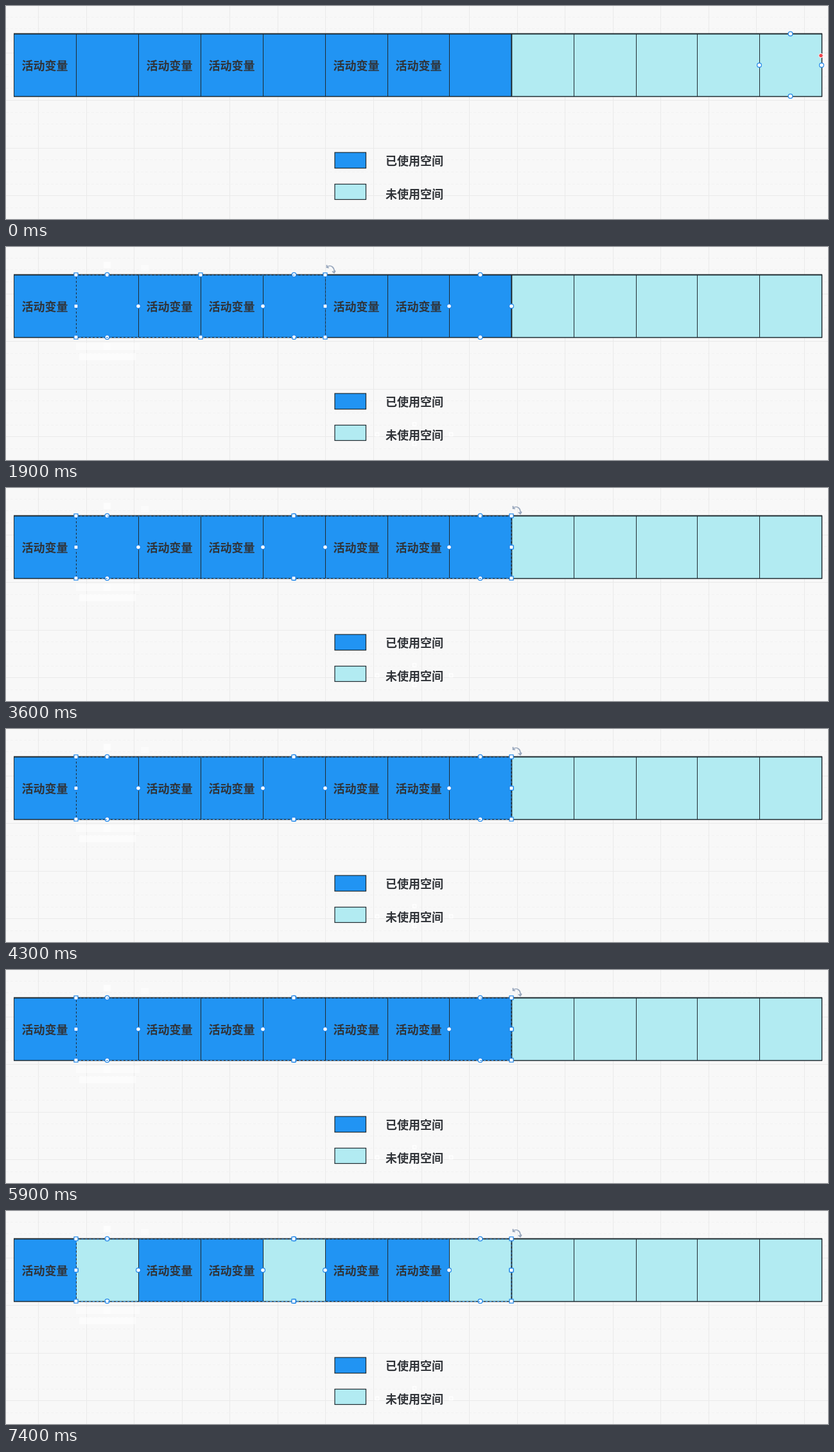
Animation of 1280 by 333 pixels, one loop 7.5 s. Source, as an HTML page:

```html
<!DOCTYPE html>
<html lang="zh">
<head>
<meta charset="utf-8">
<style>
html, body { margin: 0; width: 100%; height: 100%; overflow: hidden; background: #f8f8f8; }
svg { display: block; width: 1280px; height: 333px; }
text { font: bold 18px "Noto Sans CJK SC", "Noto Sans CJK", sans-serif; fill: #303338; }
.edge { stroke: #1f2a30; }
.handle { fill: #fff; stroke: #1f86ea; stroke-width: 1.2; }
.icon { fill: none; stroke: #98a7bd; stroke-width: 1.7; }
.ghost { fill: #fff; }
</style>
</head>
<body>
<svg id="stage" viewBox="0 0 1280 333"></svg>
<script>
const LOOP = 7500, USED = '#2194f3', FREE = '#b2ebf2', TOP = 43.5, BOTTOM = 141.5, MID = 92.5;
const edges = [12.5, 109.5, 206.5, 303.5, 400.5, 497.5, 594.5, 690.5, 787.5, 884.5, 981.5, 1076.5, 1173.5, 1270.5];
const stage = document.getElementById('stage');

function add(parent, tag, attrs, text) {
  const el = document.createElementNS('http://www.w3.org/2000/svg', tag);
  for (const key in attrs) el.setAttribute(key, attrs[key]);
  if (text) el.textContent = text;
  return parent.appendChild(el);
}
const group = () => add(stage, 'g', {});
const rect = (parent, x, y, width, height, attrs) => add(parent, 'rect', { x, y, width, height, ...attrs });
const line = (x1, y1, x2, y2, attrs) => add(stage, 'line', { x1, y1, x2, y2, ...attrs });
const circle = (parent, cx, cy) => add(parent, 'circle', { cx, cy, r: 3.4, class: 'handle' });
const square = (parent, x, y) => rect(parent, x - 3, y - 3, 6, 6, { class: 'handle' });

function drawGrid() {
  const step = 74.55 / 4;
  for (let i = -3; i < 70; i++) {
    const major = i % 4 === 0;
    const style = major ? { stroke: '#eaeaea' } : { stroke: '#f2f2f2', 'stroke-dasharray': '4 3' };
    const x = Math.floor(50.7 + i * step) + 0.5, y = Math.floor(73 + i * step) + 0.5;
    if (major) line(x, 0, x, 333, style);
    if (y < 333) line(0, y, 1280, y, style);
  }
}

// Pale traces left on the board after an earlier selection
function drawTextGhosts() {
  const g = group();
  for (const [x, y] of [[636, 277], [578, 293], [693, 293], [636, 308]])
    rect(g, x - 2.5, y - 2.5, 5, 5, { fill: 'none', stroke: '#fff', 'stroke-width': 1.5 });
  return g;
}
function drawCellGhosts() {
  const g = group();
  rect(g, 152, 23, 11, 10, { class: 'ghost', opacity: 0.7 });
  rect(g, 210, 28, 12, 10, { class: 'ghost', opacity: 0.4 });
  rect(g, 109, 150, 99, 11, { class: 'ghost', opacity: 0.4 });
  rect(g, 152, 150, 11, 11, { class: 'ghost', opacity: 0.6 });
  rect(g, 114, 166, 88, 11, { class: 'ghost', opacity: 0.6 });
  return g;
}

function cellHandles(i) {
  const g = group(), left = edges[i] - 0.5, right = edges[i + 1] - 0.5, mid = (left + right) / 2;
  circle(g, mid, TOP);
  circle(g, mid, BOTTOM - 0.5);
  circle(g, left, MID);
  circle(g, right, MID);
  return g;
}

function selection(first, last) {
  const g = group(), left = edges[first] - 0.5, right = edges[last + 1] - 0.5, mid = (left + right) / 2;
  rect(g, edges[first], TOP + 0.5, edges[last + 1] - edges[first] - 0.5, BOTTOM - TOP - 0.5,
    { class: 'ants', fill: 'none', stroke: '#2a8be6', 'stroke-dasharray': '3 3' });
  for (const x of [left, mid, right])
    for (const y of [TOP, MID, BOTTOM - 0.5])
      if (x !== mid || y !== MID) square(g, x, y);
  add(g, 'path', { class: 'icon', transform: `translate(${right + 8} 35)`,
    d: 'M-5 -4C1 -8 7 -3 6 5M-5.500 -7V-3L-2 -2.500M3 3L6 5.500L8 2' });
  return g;
}

drawGrid();
const textGhosts = drawTextGhosts(), cellGhosts = drawCellGhosts();

const cells = edges.slice(0, -1).map((x, i) =>
  rect(stage, x, TOP, edges[i + 1] - x, BOTTOM - TOP, { fill: i < 8 ? USED : FREE, class: 'edge' }));
line(12, 43.5, 1271, 43.5, { class: 'edge', 'stroke-width': 1.8 });
line(12, 141.5, 1271, 141.5, { class: 'edge', 'stroke-width': 1.5 });
line(1270.5, 43, 1270.5, 142, { class: 'edge', 'stroke-width': 1.5 });
line(787.3, 43, 787.3, 142, { class: 'edge', 'stroke-width': 2 });

for (const i of [0, 2, 3, 5, 6])
  add(stage, 'text', { x: edges[i] + 48, y: 99.5, 'text-anchor': 'middle' }, '活动变量');
rect(stage, 512, 229, 48.5, 24.5, { fill: USED, class: 'edge', 'stroke-width': 1.2 });
rect(stage, 512, 278.5, 48.5, 24, { fill: FREE, class: 'edge', 'stroke-width': 1.2 });
add(stage, 'text', { x: 591, y: 248.5 }, '已使用空间');
add(stage, 'text', { x: 591, y: 300.5 }, '未使用空间');

const lastCell = cellHandles(12);
add(lastCell, 'circle', { cx: 1269, cy: 77.5, r: 3.3, fill: '#f0444c', stroke: '#fff' });

const label = group();
for (const [x, y] of [[636, 277], [578, 293], [693, 293], [636, 308]]) square(label, x, y);

// Each item is visible from its start time until its end time
const timeline = [
  [lastCell, 0, 200],
  [label, 200, 400],
  [textGhosts, 400, LOOP],
  [cellGhosts, 1100, LOOP],
  [cellHandles(1), 700, LOOP],
  [cellHandles(4), 1500, LOOP],
  [cellHandles(5), 1700, 1800],
  [cellHandles(7), 1900, LOOP],
  [selection(1, 1), 1100, 1600],
  [selection(1, 4), 1600, 2300],
  [selection(1, 7), 2300, LOOP]
];
const ants = document.querySelectorAll('.ants');

function draw(now) {
  const t = now % LOOP;
  for (const [el, start, end] of timeline)
    el.setAttribute('visibility', t >= start && t < end ? 'visible' : 'hidden');
  for (const el of ants) el.setAttribute('stroke-dashoffset', -Math.floor(t / 100) % 6);
  for (const i of [1, 4, 7]) cells[i].setAttribute('fill', t < 6300 ? USED : FREE);
  requestAnimationFrame(draw);
}
draw(0);
</script>
</body>
</html>
```
